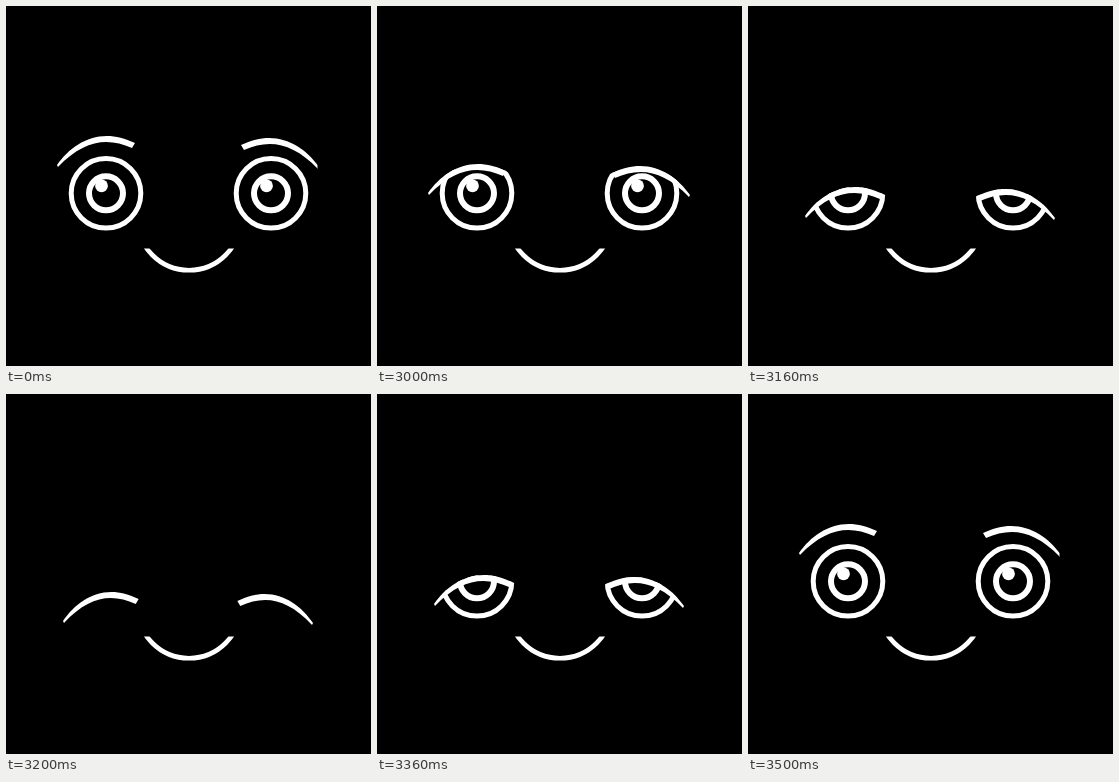
These frames come from a looping animation (365x360 px, 3.6 s). An HTML page:

```html
<!DOCTYPE html>
<html lang="en">
<head>
<meta charset="utf-8">
<title>Blinking face</title>
<style>
  html, body { margin: 0; width: 100%; height: 100%; overflow: hidden; background: #000; }
  svg { display: block; width: 100%; height: 100%; }
</style>
</head>
<body>
<svg viewBox="0 0 365 360">
  <defs>
    <filter id="soft" filterUnits="userSpaceOnUse" width="365" height="360" color-interpolation-filters="sRGB">
      <feGaussianBlur stdDeviation="0.7"/>
    </filter>
    <clipPath id="mouthClip"><rect x="120" y="242.5" width="130" height="40"/></clipPath>
    <clipPath id="lidClip"><rect width="311.5" height="360"/></clipPath>
    <g id="eye" fill="none" stroke="#fff" stroke-width="5">
      <circle r="34.8"/>
      <circle r="17" stroke-width="6"/>
      <circle cx="-4.5" cy="-7.5" r="6.4" fill="#fff" stroke="none"/>
    </g>
    <!-- The outer tip of the lid is at 0,0; the shade hides the eye above it. -->
    <g id="lid">
      <path d="M0-1C16-24 44-40 78-23L94-16V-100H-11V-1Z" fill="#000"/>
      <path d="M0-1C16-24 44-40 78-23L75-18C50-29 27-26 1 1Z" fill="#fff"/>
    </g>
  </defs>
  <rect width="365" height="360"/>
  <g filter="url(#soft)">
    <g id="eyes">
      <use href="#eye" x="100" y="187.3"/>
      <use href="#eye" x="265" y="187.3"/>
    </g>
    <use id="leftLid" href="#lid"/>
    <g id="rightSide"><use id="rightLid" href="#lid"/></g>
  </g>
  <g clip-path="url(#mouthClip)">
    <circle cx="183" cy="212.3" r="51.9" fill="none" stroke="#fff" stroke-width="4.6" filter="url(#soft)"/>
  </g>
</svg>
<script>
  const LOOP = 3600, BLINK_START = 3000, STEP = 100;
  const open = { x: 51, y: 160, width: 1 };
  const lowered = { x: 51, y: 188, width: 1 };
  const half = { x: 57, y: 211, width: 1 };
  const closed = { x: 57, y: 228, width: 0.97 };
  const blink = [lowered, half, closed, half, lowered, open];

  const byId = id => document.getElementById(id);
  const eyes = byId('eyes'), leftLid = byId('leftLid');
  const rightLid = byId('rightLid'), rightSide = byId('rightSide');

  function poseAt(time) {
    const t = time % LOOP;
    return t < BLINK_START ? open : blink[Math.floor((t - BLINK_START) / STEP)];
  }

  function draw(time) {
    const pose = poseAt(time);
    const { x, y, width } = pose;
    leftLid.setAttribute('transform', `translate(${x} ${y}) scale(${width} 1)`);
    rightLid.setAttribute('transform', `translate(${364 - x} ${y + 2}) scale(${-width} 1)`);
    rightSide.setAttribute('clip-path', pose === open ? 'url(#lidClip)' : 'none');
    eyes.setAttribute('visibility', pose === closed ? 'hidden' : 'visible');
  }

  function tick() {
    draw(performance.now());
    requestAnimationFrame(tick);
  }
  tick();
</script>
</body>
</html>
```
